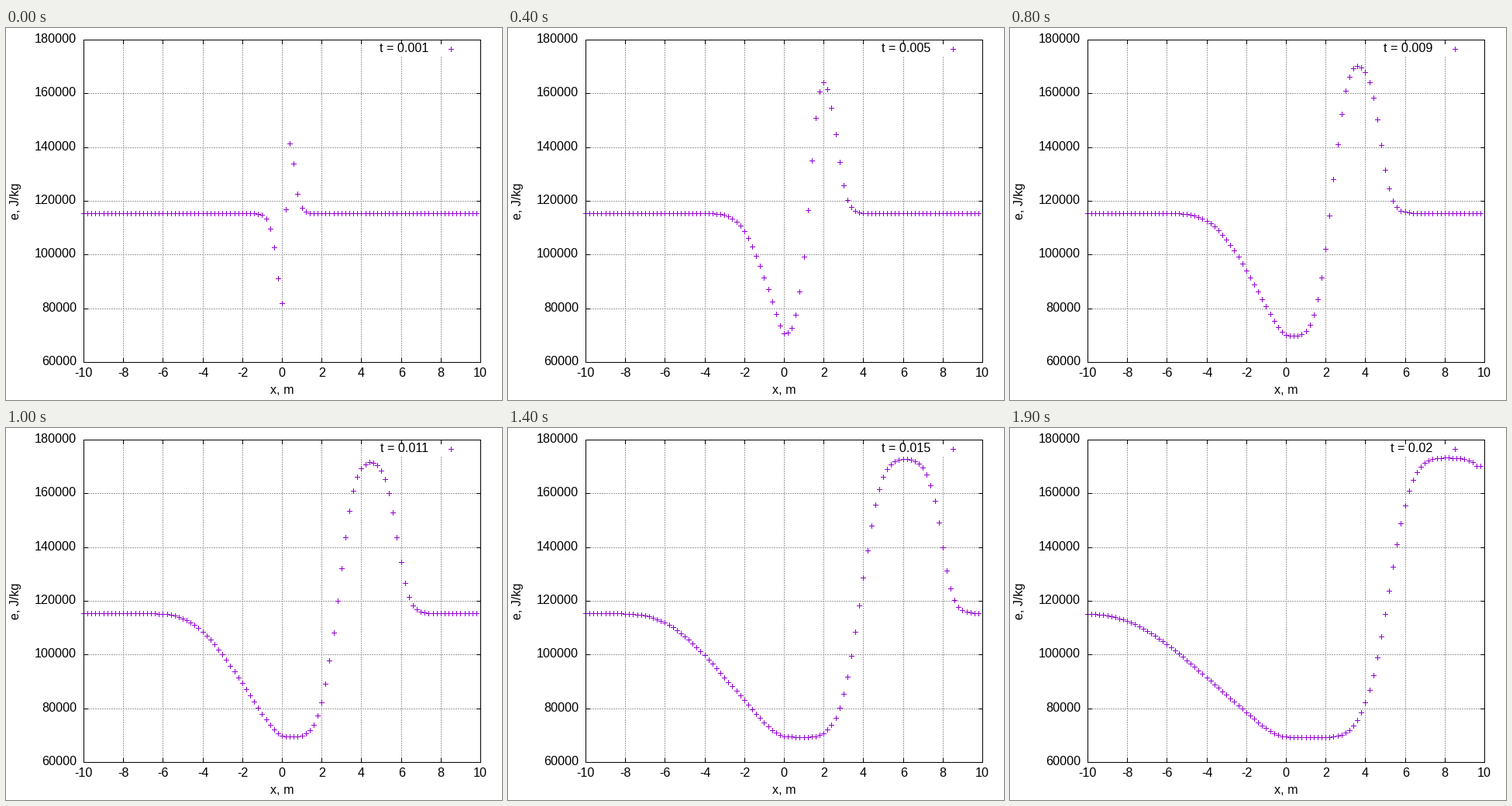
A matplotlib script for the animation above (2 s loop, 640 by 480 pixels).

```python
import numpy as np
import matplotlib.pyplot as plt
from matplotlib.animation import FuncAnimation
from matplotlib.collections import LineCollection

W, H, DPI = 640, 480, 100
PX = 72 / DPI                       # one pixel in points
LEFT, RIGHT, TOP, BOTTOM = 100, 612, 15, 431
FRAMES, INTERVAL = 20, 100

GAMMA, E0 = 1.67, 115385
DX, DT, STEPS = 0.2, 1e-5, 100      # STEPS time steps per picture
X = -10 + DX * np.arange(100)

plt.rcParams["font.family"] = "Liberation Sans"
plt.rcParams["font.size"] = 16.18 * PX   # digits advance by 9 pixels


def step(w):
    """One upwind step for w = (rho, rho*u, rho*e) along characteristics."""
    rho, u, e = w[0, 1:-1], w[1, 1:-1] / w[0, 1:-1], w[2, 1:-1] / w[0, 1:-1]
    g = GAMMA - 1
    c = np.sqrt(GAMMA * g * e)
    back, ahead = w[:, 1:-1] - w[:, :-2], w[:, 2:] - w[:, 1:-1]

    def rate(lam, row, vec):
        d = np.where(lam > 0, back, ahead)
        return lam * (row[0] * d[0] + row[1] * d[1] + row[2] * d[2]) * np.array(vec)

    one, zero = np.ones_like(u), np.zeros_like(u)
    k = 1 / (2 * c * c)
    total = (rate(u + c, (-u * c * k, c * k, g * k), (one, u + c, GAMMA * e))
             + rate(u - c, (u * c * k, -c * k, g * k), (one, u - c, GAMMA * e))
             + rate(u, (one, zero, -2 * g * k), (one, u, zero)))
    new = w.copy()
    new[:, 1:-1] -= DT / DX * total
    new[:, 0], new[:, -1] = new[:, 1], new[:, -2]
    return new


def solve():
    rho = np.where(X < -DX / 2, 13.0, 1.3)
    w = np.array([rho, 0 * rho, rho * E0])
    result = []
    for _ in range(FRAMES):
        for _ in range(STEPS):
            w = step(w)
        result.append(w[2] / w[0])
    return result


def px(x):
    return np.floor(LEFT + (np.asarray(x) + 10) * (RIGHT - LEFT) / 20 + 0.5)


def py(e):
    return np.floor(BOTTOM - (np.asarray(e) - 60000) * (BOTTOM - TOP) / 120000 + 0.5)


def hline(x0, x1, y):
    return [(x0, y + 0.5), (x1 + 1, y + 0.5)]


def vline(x, y0, y1):
    return [(x + 0.5, y0), (x + 0.5, y1 + 1)]


def crosses(xs, ys):
    return [s for x, y in zip(xs, ys)
            for s in (hline(x - 3, x + 3, y), vline(x, y - 3, y + 3))]


def add_lines(segments, color, z, style="solid"):
    lines = LineCollection(segments, colors=color, linewidths=PX, linestyles=style,
                           antialiaseds=False, capstyle="butt", zorder=z)
    lines.set_snap(False)           # coordinates already sit on pixel centres
    ax.add_collection(lines, autolim=False)
    return lines


fig = plt.figure(figsize=(W / DPI, H / DPI), dpi=DPI, facecolor="white")
ax = fig.add_axes([0, 0, 1, 1])
ax.set_xlim(0, W)
ax.set_ylim(H, 0)
ax.axis("off")

x_ticks = np.arange(-10, 11, 2)
y_ticks = np.arange(60000, 180001, 20000)
KEY_LEFT, KEY_BOTTOM = 473, 36

grid, frame = [], [hline(LEFT, RIGHT, TOP), hline(LEFT, RIGHT, BOTTOM),
                   vline(LEFT, TOP, BOTTOM), vline(RIGHT, TOP, BOTTOM)]
for v in x_ticks:
    x = px(v)
    frame += [vline(x, BOTTOM - 5, BOTTOM), vline(x, TOP, TOP + 5)]
    if LEFT < x < RIGHT:
        grid.append(vline(x, KEY_BOTTOM if x > KEY_LEFT else TOP, BOTTOM)[::-1])
    ax.text(x + 0.25, 450, str(v), ha="center", va="baseline")
for v in y_ticks:
    y = py(v)
    frame += [hline(LEFT, LEFT + 5, y), hline(RIGHT - 5, RIGHT, y)]
    if TOP < y < BOTTOM:
        grid.append(hline(LEFT, RIGHT, y))
    ax.text(91, y + 4, str(v), ha="right", va="baseline")

ax.text(356, 472, "x, m", ha="center", va="baseline")
ax.text(17, 223, "e, J/kg", ha="center", va="baseline", rotation=90,
        rotation_mode="anchor")
label = ax.text(545, 31, "", ha="right", va="baseline")

add_lines(grid, "#a0a0a0", 1, (0, (2, 2)))
add_lines(frame, "black", 4)
add_lines(crosses([574], [27]), "#9400d3", 3)
points = add_lines([], "#9400d3", 3)

energy = solve()
columns = px(X)


def draw(i):
    points.set_segments(crosses(columns, py(energy[i])))
    label.set_text(f"t = {(i + 1) / 1000:g}")
    return points, label


anim = FuncAnimation(fig, draw, frames=FRAMES, interval=INTERVAL,
                     init_func=lambda: draw(0), repeat=True, repeat_delay=0)
plt.show()
```
